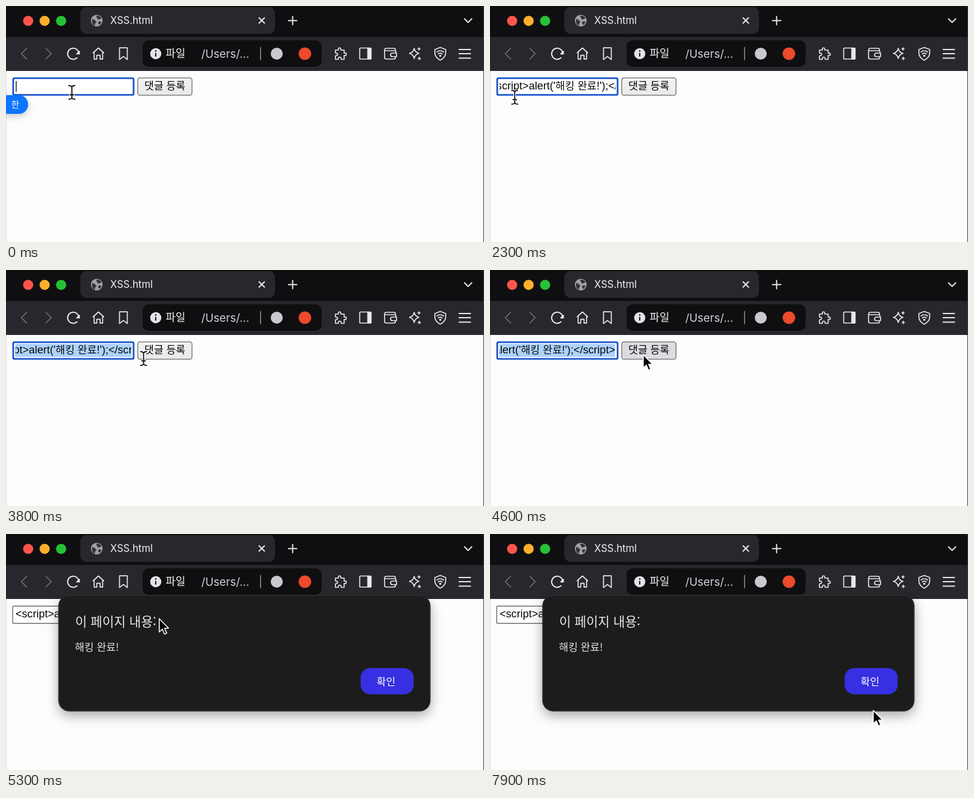
Animation, 798 px wide and 396 px high, one loop 8 s. Source, as an HTML page:

```html
<!DOCTYPE html>
<html lang="ko">
<head>
<meta charset="utf-8">
<title>XSS.html</title>
<style>
html, body { margin: 0; width: 100%; height: 100%; overflow: hidden; background: #fcfdfd; }
svg { position: absolute; left: 0; top: 0; width: 798px; height: 396px; }
text { font-family: Inter, "Noto Sans CJK KR", "Noto Sans CJK", sans-serif; white-space: pre; }
.field { font: 18.1px "Liberation Sans", Arial, "Noto Sans CJK KR", sans-serif; }
.ko { font-family: "Noto Sans CJK KR", "Noto Sans CJK", sans-serif; }
.icon { fill: none; stroke: #e8e8ec; stroke-width: 1.7; stroke-linecap: round; stroke-linejoin: round; }
#dialog { transform-origin: 398px 200px; }
</style>
</head>
<body>
<svg id="page" viewBox="0 0 798 396">
  <defs>
    <clipPath id="inner"><rect x="15.5" y="122" width="194" height="26"/></clipPath>
    <linearGradient id="face" x2="0" y2="1"><stop stop-color="#f3f3f4"/><stop offset="1" stop-color="#e9e9eb"/></linearGradient>
    <filter id="soft" x="-50%" y="-50%" width="200%" height="220%">
      <feDropShadow dx="0" dy="4" stdDeviation="6" flood-color="#000" flood-opacity=".2"/>
    </filter>
  </defs>
  <rect width="798" height="396" fill="#fcfdfd"/>
  <rect width="798" height="53" fill="#0f0f11"/>
  <rect y="52" width="798" height="57" fill="#28272d"/>
  <path d="M.5 109V396" stroke="#dcdde0"/>
  <path d="M797.5 0V396" stroke="#3b3b3d"/>

  <circle cx="37" cy="25" r="8.5" fill="#ff544c"/>
  <circle cx="64.5" cy="25" r="8.5" fill="#fdb02b"/>
  <circle cx="92" cy="25" r="8.5" fill="#27c138"/>
  <rect x="124" y="2" width="325" height="44.5" rx="10" fill="#28272d"/>
  <g transform="translate(151.5 24.5)">
    <circle r="9.8" fill="#a0a0a5"/>
    <path d="M-7.5-3C-4-1-1 0-1 2C-1 4-3 4-3 7L-3.5 8.5C-7 7-9 2-7.5-3ZM-1-8C4-9 7-6 8-3C5-4 4-1 2-2C0-3 2-5 0-5ZM3 2C5 1 7 2 8 2C7 5 5 7 3 7C4 5 1 4 3 2Z" fill="#333238"/>
  </g>
  <text x="174" y="30" font-size="16.6" fill="#f4f4f6">XSS.html</text>
  <g class="icon" style="stroke-width:2">
    <path d="M422.5 19.8l9 9m0-9l-9 9M471.5 24.5h14m-7-7v14M765.5 21.5l6 6 6-6"/>
  </g>

  <g class="icon">
    <path d="M34.5 71l-9 9 9 9M66.5 71l9 9-9 9" stroke="#727178"/>
    <path d="M118.5 87A9.3 9.3 0 1 1 121.5 79" stroke-width="2"/>
    <path d="M118 80.5h4.5v-4.5z" fill="#e8e8ec"/>
    <path d="M145.5 78.5l8.8-8 8.8 8M147.2 77.5V89.2h4.3v-6.5h5.5v6.5h4.3V77.5"/>
    <path d="M189.5 70.2h13v19.6l-6.5-5.2-6.5 5.2z"/>
    <path d="M550 74h5c-2-5 5.500-5 4 0h5.500v5c5-1.500 5 5.500 0 4v6.500h-5c1-5-6-5-4.500 0h-5v-6c5 0 5-5 0-4.500z"/>
    <rect x="590.500" y="70.500" width="19" height="18.500" rx="1"/>
    <path d="M604 71h5v18h-5z" fill="#e8e8ec"/>
    <path d="M650 75V73q0-2-2-2H635q-3 0-3 3v12q0 3 3 3h13q2 0 2-2v-2M632.500 75h16q2.500 0 2.500 2v2M652 79h-7q-3 0-3 3t3 3h7z"/>
    <path d="M681.500 71q1.500 7 8 8.500q-6.500 1.500-8 8.500q-1.500-7-8-8.500q6.500-1.500 8-8.500zM689.500 70v4m-2-2h4M690 86v4m-2-2h4"/>
    <path d="M725 69.500l9 3.500v6q0 7-9 12q-9-5-9-12v-6zM719.500 77q5.500-4 11 0M721.800 80.300q3.200-2.300 6.400 0"/>
    <circle cx="725" cy="83.500" r="1" fill="#e8e8ec"/>
    <path d="M756.500 73h19m-19 7h19m-19 7.500h19" stroke-width="1.900"/>
  </g>
  <rect x="228" y="57.500" width="299" height="44.500" rx="10" fill="#0f0f11"/>
  <circle cx="250" cy="80" r="9.300" fill="#e2e2e8"/>
  <path d="M250 78.800v6" stroke="#0f0f11" stroke-width="2"/>
  <circle cx="250" cy="75.500" r="1.300" fill="#0f0f11"/>
  <text class="ko" x="266.500" y="86" font-size="18" fill="#f0f0f4">파일</text>
  <text x="326" y="86.500" font-size="18.600" fill="#d0d0d8">/Users/...</text>
  <path d="M425 69v22" stroke="#aaaab0" stroke-width="1.300"/>
  <circle cx="452" cy="80" r="10" fill="#c9cad0"/>
  <circle cx="499" cy="80" r="10.500" fill="#ec4a2c"/>

  <rect id="box" fill="#fff"/>
  <g clip-path="url(#inner)">
    <rect id="mark" y="124" height="22" fill="#aed2ff"/>
    <text id="code" class="field" y="140.300" fill="#080808"></text>
  </g>
  <path id="caret" d="M17 126v18" stroke="#111" stroke-width="1.400"/>
  <rect id="send" x="220" y="120.700" width="90.500" height="29" rx="3.500" stroke="#68686c" stroke-width="1.300"/>
  <text class="ko" x="231" y="140.300" font-size="17.300" fill="#080808">댓글 등록</text>
  <g id="ime">
    <rect x="-12" y="149.500" width="49" height="31.500" rx="15.750" fill="#0a75ff" filter="url(#soft)"/>
    <text class="ko" x="15.500" y="170.500" font-size="14.500" text-anchor="middle" fill="#fff">한</text>
  </g>
</svg>

<svg id="dialog" viewBox="0 0 798 396">
  <defs>
    <filter id="deep" x="-20%" y="-30%" width="140%" height="180%">
      <feDropShadow dx="0" dy="7" stdDeviation="10" flood-color="#000" flood-opacity=".34"/>
    </filter>
  </defs>
  <rect x="87.500" y="102.500" width="621" height="195" rx="18" fill="#1a1a1c" filter="url(#deep)"/>
  <rect x="88" y="103" width="620" height="194" rx="17.500" fill="none" stroke="#38383b"/>
  <text class="ko" x="115.500" y="155" font-size="21.300" font-weight="500" fill="#e9e9ed">이 페이지 내용:</text>
  <text class="ko" x="115" y="195.500" font-size="17.200" fill="#e3e3e7">해킹 완료!</text>
  <rect x="592" y="225" width="88.500" height="44" rx="16" fill="#3730e2"/>
  <text class="ko" x="634.500" y="253.500" font-size="17" font-weight="500" text-anchor="middle" fill="#fff">확인</text>
</svg>

<svg viewBox="0 0 798 396">
  <g id="beam" fill="none" stroke-linecap="round">
    <path id="stem" d="M-5-11.500q5 0 5 3.500q0-3.500 5-3.500M0-8V8M-5 11.500q5 0 5-3.500q0 3.500 5 3.500M-3 4h6" stroke="#fff" stroke-width="3.600"/>
    <use href="#stem" style="stroke:#111"/>
    <path d="M-5-11.500q5 0 5 3.500q0-3.500 5-3.500M0-8V8M-5 11.500q5 0 5-3.500q0 3.500 5 3.500M-3 4h6" stroke="#111" stroke-width="1.800"/>
  </g>
  <path id="arrow" d="M.8 1V23.500L6 18.700L9.600 27L13.400 25.300L9.800 17.300H16.500Z" fill="#050505" stroke="#fff" stroke-width="1.600" stroke-linejoin="round"/>
</svg>

<script>
const LOOP = 8000;
const PASTE = 900, DRAG = 2700, RELEASE = 4100, ALERT = 5000;
const LEFT = 16, RIGHT = 209;
const $ = id => document.getElementById(id);
const clamp = v => Math.max(0, Math.min(1, v));
const span = (t, a, b) => clamp((t - a) / (b - a));
const smooth = p => p * p * (3 - 2 * p);

function set(id, attrs) {
  for (const key in attrs) $(id).setAttribute(key, attrs[key]);
}
const show = (id, on) => $(id).style.display = on ? '' : 'none';

// Pointer stops: time, x, y
const stops = [
  [0, 110, 145], [900, 110, 145], [1300, 118, 139.5], [1750, 118, 139.5],
  [2200, 44, 154], [2600, 27, 149], [2700, 27, 149], [3200, 136, 148],
  [3650, 226, 148], [4100, 240, 150], [4600, 255, 141], [5300, 255, 141],
  [6200, 319, 172], [6400, 319, 172], [7150, 603, 254], [7900, 639, 295], [8000, 639, 295]
];

function pointer(t) {
  const i = Math.max(1, stops.findIndex(s => s[0] > t));
  const [a, b] = [stops[i - 1], stops[i]];
  const p = smooth(span(t, a[0], b[0]));
  return [a[1] + (b[1] - a[1]) * p, a[2] + (b[2] - a[2]) * p];
}

// Hangul is set slightly smaller than the Latin text around it
const code = $('code');
for (const run of "<script>alert('해킹 완료!');<\/script>".match(/[가-힣]+|[^가-힣]+/g)) {
  const part = document.createElementNS('http://www.w3.org/2000/svg', 'tspan');
  part.textContent = run;
  if (/[가-힣]/.test(run)) part.setAttribute('style', 'font-size:17.3px');
  code.append(part);
}
const count = code.getNumberOfChars();
const edges = [0];
for (let i = 1; i <= count; i++) edges.push(code.getSubStringLength(0, i));
const maxScroll = edges[count] - (RIGHT - LEFT);

function scrollAt(t) {
  if (t >= ALERT) return 0;
  if (t < DRAG) return maxScroll * (1 - smooth(span(t, 1950, 2450)));
  return maxScroll * span(t, 3600, 3950);
}

function selection(t, x, scroll) {
  if (t < DRAG || t >= ALERT) return [0, 0];
  const want = t >= 3950 ? edges[count] : x - 2 - LEFT + scroll;
  const end = edges.reduce((best, e) => Math.abs(e - want) < Math.abs(best - want) ? e : best);
  return [edges[1], Math.max(edges[1], end)];
}

function draw(t) {
  const [x, y] = pointer(t);
  const focus = t < ALERT;
  const scroll = scrollAt(t);
  const [from, to] = selection(t, x, scroll);

  set('box', focus
    ? { x: 12, y: 121.2, width: 201, height: 28, rx: 2.5, stroke: '#1753c9', 'stroke-width': 2.8 }
    : { x: 11.2, y: 121, width: 202.5, height: 29, rx: 2, stroke: '#6a6a6e', 'stroke-width': 1.4 });
  set('mark', { x: LEFT - scroll + from, width: to - from });
  set('code', { x: LEFT - scroll });
  show('code', t >= PASTE);
  show('caret', t < PASTE && t % 1000 < 500);
  set('ime', { opacity: 1 - span(t, 350, 600) });
  set('send', { fill: t >= 4300 && focus ? '#dcdce0' : 'url(#face)' });

  const rest = (1 - span(t, ALERT, ALERT + 200)) ** 3;
  show('dialog', t > ALERT);
  $('dialog').style.opacity = 1 - rest;
  $('dialog').style.transform = rest
    ? `translateY(${-32 * rest}px) perspective(1500px) rotateX(${28 * rest}deg) scale(${1 - 0.05 * rest})`
    : 'none';

  const beam = t < RELEASE;
  show('beam', beam);
  show('arrow', !beam);
  set(beam ? 'beam' : 'arrow', { transform: `translate(${x} ${y})` });
}

const start = performance.now();
function tick(now) {
  draw(Math.max(0, now - start) % LOOP);
  requestAnimationFrame(tick);
}
draw(0);
requestAnimationFrame(tick);
</script>
</body>
</html>
```
